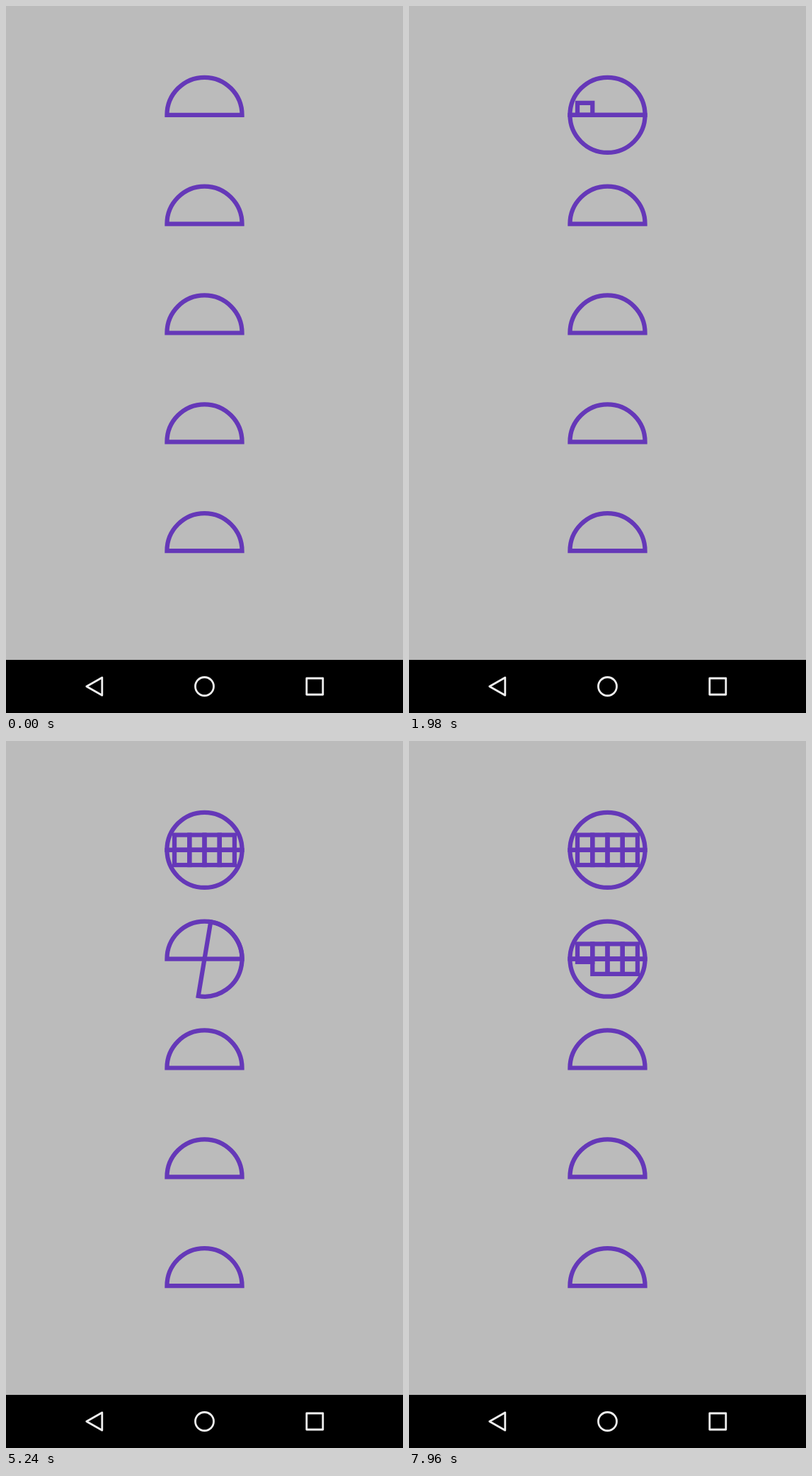
Recreate the animation shown at these times as an HTML page with a canvas. Size 561 by 998 pixels, loop 8 s.

```html
<!DOCTYPE html>
<html lang="en">
<head>
<meta charset="utf-8">
<title>Semicircle grid</title>
<style>
html, body { margin: 0; width: 100%; height: 100%; overflow: hidden; background: #bbb; }
canvas { display: block; width: 561px; height: 998px; }
</style>
</head>
<body>
<canvas id="stage" width="561" height="998"></canvas>
<script>
const ctx = document.getElementById('stage').getContext('2d');
const W = 561, H = 998, BAR_Y = 923;
const LOOP = 8000, STEP = 46, FIRST = 1052;
const NODES = 5, GAP = BAR_Y / (NODES + 1);
const R = GAP / 2.9, STROKE = W / 90;
const COLS = 4, CELL = R * 1.6 / COLS;
const STARTS = [0, 82]; // step at which each node begins to move

const clamp = (v, lo, hi) => Math.min(hi, Math.max(lo, v));

function semicircle(angle) {
  ctx.save();
  ctx.rotate(angle * Math.PI / 180);
  ctx.beginPath();
  ctx.arc(0, 0, R, Math.PI, 2 * Math.PI);
  ctx.closePath();
  ctx.stroke();
  ctx.restore();
}

// Upper row fills left to right, lower row right to left.
function cells(amount) {
  for (let i = 0; i < 2 * COLS; i++) {
    const part = clamp(amount - i, 0, 1);
    if (part <= 0) break;
    const upper = i < COLS;
    const col = upper ? i : 2 * COLS - 1 - i;
    const h = CELL * part;
    ctx.strokeRect((col - COLS / 2) * CELL, upper ? -h : 0, CELL, h);
  }
}

function node(i, step) {
  const n = i in STARTS ? step - STARTS[i] : 0;
  const angle = clamp(12.66 * (n - 1.14), 0, 180);
  ctx.save();
  ctx.translate(W / 2, GAP * (i + 1));
  semicircle(0);
  if (angle > 0) semicircle(angle);
  if (angle === 180) cells((n - 14) / 7.5);
  ctx.restore();
}

function navBar() {
  ctx.fillStyle = '#000';
  ctx.fillRect(0, BAR_Y, W, H - BAR_Y);
  ctx.strokeStyle = '#f0f0f0';
  ctx.lineWidth = 2.8;
  ctx.lineJoin = 'round';
  ctx.beginPath();
  ctx.moveTo(113.8, 960.5);
  ctx.lineTo(135.8, 948);
  ctx.lineTo(135.8, 973);
  ctx.closePath();
  ctx.stroke();
  ctx.beginPath();
  ctx.arc(280.5, 960.5, 13, 0, 2 * Math.PI);
  ctx.stroke();
  ctx.strokeRect(424.8, 949, 23, 23);
}

function draw(t) {
  const step = Math.floor((t - FIRST) / STEP);
  ctx.fillStyle = '#bbb';
  ctx.fillRect(0, 0, W, H);
  ctx.strokeStyle = '#6538b8';
  ctx.lineWidth = STROKE;
  ctx.lineJoin = 'miter';
  for (let i = 0; i < NODES; i++) node(i, step);
  navBar();
}

const begin = performance.now();
function frame() {
  draw((performance.now() - begin) % LOOP);
  requestAnimationFrame(frame);
}
frame();
</script>
</body>
</html>
```
